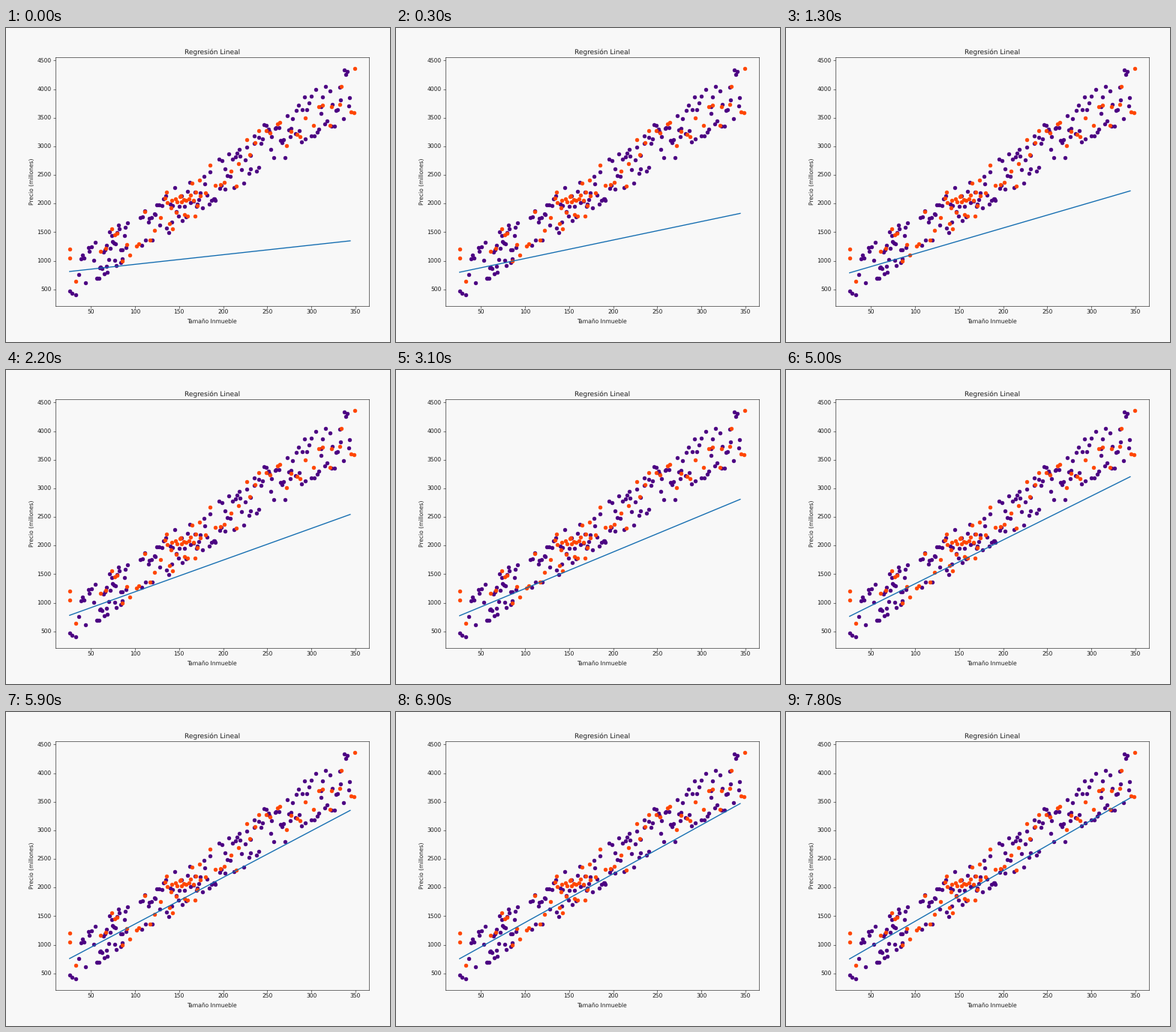
Recreate the animation shown at these times as a matplotlib script. Size 512 px wide and 419 px high, loop 8000 ms.

```python
import numpy as np
import matplotlib.pyplot as plt
from matplotlib.animation import FuncAnimation

W, H, DPI = 512, 419, 64
K = 0.845  # shrink of the default point sizes
STEP_MS, LOOP_MS = 100, 8000
BACK, INK = "#f8f8f8", "#1c1c1c"
INDIGO, ORANGE, BLUE = "#4b0082", "#ff4500", "#126cb0"

plt.rcParams.update({
    "font.family": "DejaVu Sans",
    "font.size": 10 * K,
    "text.hinting": "none",
    "text.color": INK,
    "axes.labelcolor": INK,
    "axes.edgecolor": INK,
    "xtick.color": INK,
    "ytick.color": INK,
    "axes.titlepad": 5 * K,
    "axes.labelpad": 4 * K,
    "axes.linewidth": 0.8 * K,
})


def cloud(n, share, sizes, seed):
    """Prices in a band around a straight trend, sizes spread by quantiles."""
    rng = np.random.default_rng(seed)
    u = (np.arange(n) + rng.random(n)) / n
    x = np.round(np.interp(u, share, sizes))
    half = 350 + 0.3 * x
    return x, 450 + 10.2 * x + half * rng.uniform(-1, 1, n)


train = cloud(175, [0, 0.06, 0.24, 0.241, 1], [35, 57, 92, 105, 345], seed=7)
test = cloud(69, [0, 0.12, 0.21, 0.58, 1], [61, 99, 134, 175, 345], seed=3)

# The few points that mark the corners of the cloud
train_ends = [26, 29, 33], [465, 425, 410]
test_ends = [26, 26, 33, 348, 349], [1200, 1045, 640, 3595, 4365]

# Gradient descent: both line ends close in on their limits
ENDS = np.array([26, 344])
LIMIT = np.array([741, 4013])
ERROR = np.array([71, -2665])
DECAY = 0.82
CHANGES = [300, 1300, 2200, 3100, 4100, 5000, 5900, 6900, 7800]


def fitted(step):
    return LIMIT + ERROR * DECAY ** step


fig = plt.figure(figsize=(W / DPI, H / DPI), dpi=DPI, facecolor=BACK)
left, right, top, bottom = 65.8, 483.8, 38.7, 370.7
ax = fig.add_axes([left / W, 1 - bottom / H, (right - left) / W, (bottom - top) / H],
                  facecolor=BACK)
ax.set(xlim=(9.85, 365.15), ylim=(212, 4562),
       xticks=range(50, 351, 50), yticks=range(500, 4501, 500),
       title="Regresión Lineal", ylabel="Precio (millones)")
ax.set_xlabel("Tamaño Inmueble", labelpad=6 * K)
ax.tick_params(length=3.5 * K, width=0.8 * K, pad=3.5 * K)

for groups, color in (((train, train_ends), INDIGO), ((test, test_ends), ORANGE)):
    for x, y in groups:
        ax.scatter(x, y, c=color, s=(6 * K) ** 2, linewidths=1)
line, = ax.plot(ENDS, fitted(0), color=BLUE, lw=1.5)


def draw(i):
    step = np.searchsorted(CHANGES, i * STEP_MS, side="right")
    line.set_ydata(fitted(step))
    return line,


anim = FuncAnimation(fig, draw, frames=LOOP_MS // STEP_MS, interval=STEP_MS,
                     repeat=True, repeat_delay=0)
plt.show()
```
